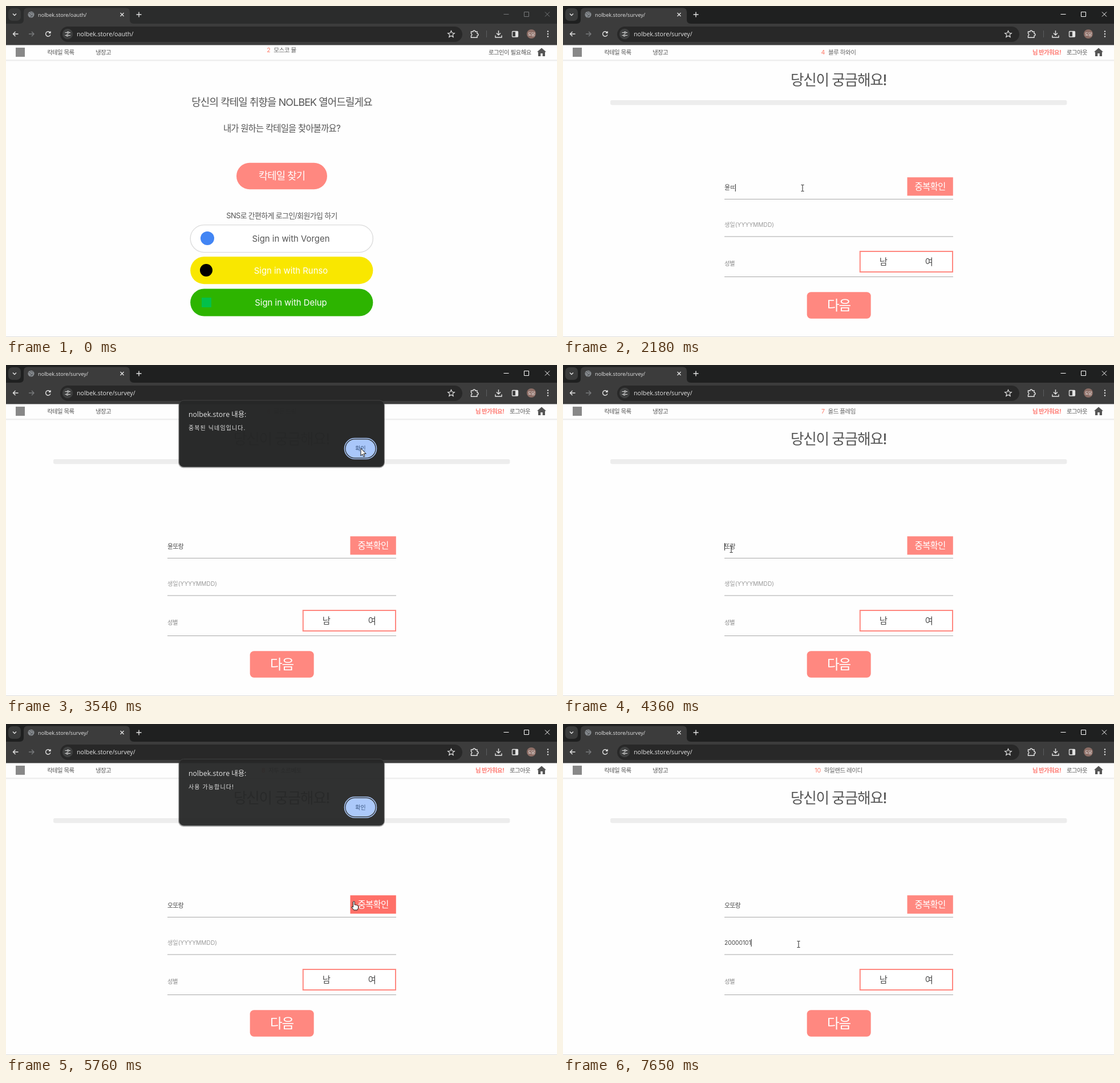
An HTML page that plays this animation: 966x580 px, repeating every 8000 ms.

```html
<!DOCTYPE html>
<html lang="ko">
<head>
<meta charset="utf-8">
<title>Sign-up flow</title>
<style>
html, body { margin: 0; width: 100%; height: 100%; overflow: hidden; background: #fff; }
svg { display: block; width: 100%; height: 100%; }
text { font-family: Inter, 'Noto Sans CJK KR', 'Noto Sans CJK', sans-serif; letter-spacing: -.05em; white-space: pre; }
.latin { letter-spacing: 0; }
.ui { font-family: 'Open Sans', 'Noto Sans CJK KR', sans-serif; letter-spacing: 0; }
.wide { letter-spacing: 1.1px; }
.line { fill: none; stroke-width: 1.4; }
</style>
</head>
<body>
<svg id="stage" viewBox="0 0 966 580" xmlns="http://www.w3.org/2000/svg"></svg>
<script>
const CORAL = '#ff8880', HOT = '#ff7068', INK = '#555', LIGHT = '#e3e3e3';
const $ = id => document.getElementById(id);

// Text is placed by its vertical centre.
const text = (x, y, size, str, fill = INK, attrs = '') =>
  `<text x="${x}" y="${y + size * .36}" font-size="${size}" fill="${fill}" ${attrs}>${str}</text>`;
const mid = (x, y, size, str, fill, attrs = '') =>
  text(x, y, size, str, fill, 'text-anchor="middle" ' + attrs);
const rect = (x, y, w, h, r, fill, attrs = '') =>
  `<rect x="${x}" y="${y}" width="${w}" height="${h}" rx="${r}" fill="${fill}" ${attrs}/>`;
const line = (d, color, attrs = '') => `<path class="line" d="${d}" stroke="${color}" ${attrs}/>`;
const dot = (x, y, r, fill) => `<circle cx="${x}" cy="${y}" r="${r}" fill="${fill}"/>`;
const latin = str => `<tspan class="latin">${str}</tspan>`;

const browser = `
  <rect id="titlebar" width="966" height="31"/>
  ${rect(4, 4, 22, 22, 7, '#3a3b3b')}${line('M12 13.5l3 3l3-3', LIGHT)}
  <path d="M24 31q7 0 7-7V10.500q0-7 7-7H210q7 0 7 7V24q0 7 7 7z" fill="#3c3c3c"/>
  ${rect(0, 31, 966, 37.500, 0, '#3c3c3c')}
  <g id="globe">${dot(44, 15, 5.6, '#868a8e')}
    ${line('M39.5 13q3 0 3.5 2.5t4-.5M42 10.5q2 2.5 6 1.5M43 20q0-3 4-3', '#505356', 'style="stroke-width:1"')}</g>
  <g id="spinner">${line('M44 9.8a5.2 5.2 0 1 1-5.2 5.2', '#a8c7fa')}</g>
  <text id="title" class="ui" x="56" y="19.2" font-size="9.2" fill="${LIGHT}"></text>
  ${line('M200.5 12l6 6m0-6l-6 6', LIGHT)}
  ${line('M233 10.5v9m-4.5-4.5h9', LIGHT)}
  <g id="winButtons" class="line" style="stroke-width:1">
    <path d="M872.5 14.5h9M908.5 10.5h8v8h-8zM945 10.5l8 8m0-8l-8 8"/></g>
  ${line('M21.5 49H12.5m4-4l-4 4l4 4', LIGHT)}
  ${line('M40 49h9m-4-4l4 4l-4 4', '#77797b')}
  ${line('M77.4 46.7a4.2 4.2 0 1 0 .5 3.4M78 44.3v3h-3', LIGHT)}
  ${rect(95, 36, 705, 27, 13.5, '#282828')}
  ${dot(108, 49, 9.2, '#3f4040')}
  ${line('M103.5 46.5h3m4.5 0h2M103.5 51.5h2m4.5 0h3', LIGHT, 'style="stroke-width:1.2"')}
  <g class="line" stroke="${LIGHT}" style="stroke-width:1.2"><circle cx="108.7" cy="46.5" r="1.5"/><circle cx="107.5" cy="51.5" r="1.5"/></g>
  <text id="address" class="ui" x="124" y="53.4" font-size="10.7" fill="${LIGHT}"></text>
  ${line('M780.5 43.5l1.7 3.8 4.1.4-3.1 2.7.9 4.1-3.6-2.2-3.6 2.2.9-4.1-3.1-2.7 4.1-.4z', LIGHT, 'style="stroke-width:1.2"')}
  ${line('M815.5 45h3.3a2 2 0 0 1 4 0h3.2v3.3a2 2 0 0 1 0 4v3h-10.5v-3.2a2 2 0 0 0 0-3.8z', LIGHT)}
  ${line('M842.5 43v12', '#5c5e60', 'style="stroke-width:1"')}
  ${line('M863.5 43v8m-3.5-3.4l3.5 3.5 3.5-3.5M858 51.5v3.5h11v-3.5', LIGHT)}
  ${rect(887.5, 44.5, 10, 9.5, 1, 'none', `stroke="${LIGHT}" stroke-width="1.3"`)}${rect(893, 45, 5, 9, 0, LIGHT)}
  ${dot(921, 49, 8, '#8d6e66')}${mid(921, 49, 7, '도담', '#fff')}
  ${[44.5, 49, 53.5].map(y => dot(950, y, 1.2, LIGHT)).join('')}`;

const header = `
  ${rect(0, 94.5, 966, 1, 0, '#dedede')}${rect(0, 95.5, 966, 1, 0, '#f1f1f1')}
  ${rect(17, 73, 16, 16, 0, '#888')}
  ${text(72, 81, 10.4, '칵테일 목록')}${text(157, 81, 10.4, '냉장고')}
  <text id="ticker" x="483" text-anchor="middle" font-size="10.6"><tspan
    id="rank" class="latin" fill="#ff7a68"></tspan><tspan id="drink" dx="5.5" fill="#666"></tspan></text>
  <path d="M939 73.5l8 7h-2v7.5h-4.3v-5h-3.4v5H933v-7.5h-2z" fill="#555"/>
  ${rect(0, 579, 966, 1, 0, '#dedede')}`;

const signIn = (y, fill, color, name, icon, border = '') =>
  rect(323.2, y, 320.2, 48, 24, fill, border) + icon +
  mid(499.5, y + 24.2, 14.9, 'Sign in with ' + name, color, 'class="latin"');

const login = `
  ${text(846, 81, 10.4, '로그인이 필요해요')}
  ${mid(483.5, 168.5, 17.9, '당신의 칵테일 취향을 NOLBEK 열어드릴게요')}
  ${mid(483.5, 214, 15.4, '내가 원하는 칵테일을 찾아볼까요?')}
  ${rect(404, 274.8, 159, 46.5, 23.2, CORAL)}${mid(483.5, 298, 17.8, '칵테일 찾기', '#fff')}
  ${mid(483.5, 367.5, 12.9, 'SNS로 간편하게 로그인/회원가입 하기')}
  ${signIn(383.6, '#fff', INK, 'Vorgen', dot(353, 407, 12, '#4285f4'), 'stroke="#dcdcdc" stroke-width="1.4"')}
  ${signIn(439.2, '#f9e700', '#fff', 'Runso', dot(351, 463, 11, '#000'))}
  ${signIn(495.5, '#2db400', '#fff', 'Delup', rect(343, 511, 17, 17, 0, '#03c04a'))}`;

const survey = `
  ${text(823, 81, 10.4, '님 반가워요!', '#ff7a72', 'font-weight="700"')}${text(883, 81, 10.4, '로그아웃')}
  ${mid(483, 130, 25.6, '당신이 궁금해요!', INK, 'font-weight="500"')}
  ${rect(83, 165, 800.5, 8.5, 3, '#ededed')}
  ${[338, 403.5, 474].map(y => rect(283, y, 401, 1, 0, '#a8a8a8')).join('')}
  <text id="nick" x="283" y="321.9" font-size="10.8"></text>
  <text id="birth" class="latin" x="283" y="387.4" font-size="10.2"></text>
  <rect id="caret" width="1" height="13" fill="#222"/>
  ${text(283, 451.5, 10.4, '성별', '#888')}
  <rect id="check" x="603.5" y="300.2" width="80.3" height="32.2"/>
  ${mid(643.5, 316.5, 15.5, '중복확인', '#fff')}
  ${rect(520.8, 430, 162.2, 36, 0, '#fff', `stroke="${CORAL}" stroke-width="2"`)}
  ${mid(561.5, 448, 15.4, '남', '#4c4c4c')}${mid(641.5, 448, 15.4, '여', '#4c4c4c')}
  ${rect(427.7, 501.2, 112, 46.6, 7, CORAL)}${mid(483.5, 524.5, 23.6, '다음', '#fff')}`;

const dialog = `
  ${rect(302, 62, 362, 118.5, 9, '#000', 'opacity=".3"')}
  ${rect(303.5, 62, 359.5, 116.5, 8, '#262727', 'stroke="#4a4b4b" stroke-width=".8"')}
  ${text(320, 87, 12.4, 'nolbek.store 내용:', LIGHT, 'class="ui"')}
  <text id="message" class="wide" x="320" y="114.3" font-size="10" fill="${LIGHT}"></text>
  ${rect(593.5, 128.5, 56, 36, 18, 'none', 'stroke="#a8c7fa" stroke-width="1.5"')}
  ${rect(595.5, 130.5, 52, 32, 16, '#a8c7fa')}
  ${mid(621.5, 146.5, 10, '확인', '#34517f', 'style="letter-spacing:0"')}`;

const cursors = `
  <g id="beam">${line('M-2.5-5.5h2l.5.5.5-.5h2M0-5V5M-2.5 5.5h2l.5-.5.5.5h2', '#222', 'style="stroke-width:1"')}</g>
  <path id="hand" d="M-1.5.5q1.5-1.5 2.7 0V6q1.5-.8 2.2.3 1.5-.6 2.2.6 2-.3 2 1.4v3.2L6 15H-.2L-4.3 9.8q.6-1.7 2.8.2z"
    fill="#fff" stroke="#111"/>
  <path id="arrow" d="M0 0V13l3-2.8 2 4.6 2-.9-2-4.4h4.2z" fill="#fff" stroke="#111"/>`;

$('stage').innerHTML = `
  ${rect(0, 0, 966, 580, 0, '#fefefe')}${header}
  <g id="login">${login}</g><g id="survey">${survey}</g>${browser}
  <g id="dialog">${dialog}</g><g id="cursor">${cursors}</g>`;

const SWAP = 900;
const pointer = [
  [70, 520, 545], [450, 505, 380], [830, 497, 321], [960, 497, 321], [1400, 420, 319],
  [2690, 420, 319], [2820, 651, 321], [3050, 651, 321], [3400, 622, 146], [3560, 622, 146],
  [3960, 295, 323], [4600, 295, 323], [5130, 565, 322], [5400, 610, 311], [6040, 610, 311],
  [6250, 417, 373], [6390, 413, 386], [8000, 413, 386]];
// time, value, caret index
const nickSteps = [
  [0, '', 0], [1790, 'ㅇ', 1], [1880, '유', 1], [1980, '윤', 1], [2110, '윤ㄸ', 2], [2230, '윤또', 2],
  [2350, '윤또ㄹ', 3], [2460, '윤또라', 3], [2570, '윤또랑', 3], [3900, '윤또랑', 1],
  [4360, '또랑', 0], [4450, 'ㅇ또랑', 1], [4540, '오또랑', 1]];
const birthSteps = [0, 6590, 6790, 7010, 7120, 7320, 7430, 7540, 7650]
  .map((t, i) => [t, '20000101'.slice(0, i), i]);
const ranking = [
  [0, 2, '모스코 뮬'], [970, 3, '핑크 레이디'], [1860, 4, '블루 하와이'], [2400, 5, '베스퍼 마티니'],
  [3000, 6, '골든 드림'], [3900, 7, '올드 플레임'], [4900, 8, '자두 소르베토'],
  [5900, 9, '노을구름 자두 소르베토'], [6900, 10, '하일랜드 레이디']];
const dialogs = [[2816, 3540, '중복된 닉네임입니다.'], [5604, 5965, '사용 가능합니다!']];

const clamp = v => Math.max(0, Math.min(1, v));
const within = (t, a, b) => t >= a && t < b;
const current = (list, t) => list.findLast(s => s[0] <= t);
const show = (id, on) => $(id).setAttribute('display', on ? 'inline' : 'none');
const set = (id, str) => { if ($(id).textContent !== str) $(id).textContent = str; };

function field(id, value, hint) {
  set(id, value || hint);
  $(id).setAttribute('fill', value ? '#444' : '#999');
}

function drawCaret(t, nick, birth) {
  const inNick = within(t, 1400, 2816) || within(t, 3900, 5560);
  const inBirth = t >= 6390;
  show('caret', inNick || inBirth);
  if (!inNick && !inBirth) return;
  const [id, n, y] = inNick ? ['nick', nick[2], 312] : ['birth', birth[2], 377];
  const x = 283 + (n ? $(id).getSubStringLength(0, n) : 0);
  $('caret').setAttribute('x', x);
  $('caret').setAttribute('y', y);
}

function drawDialog(t) {
  const d = dialogs.find(([a, b]) => within(t, a, b + 70));
  show('dialog', d);
  if (!d) return;
  const [open, close, str] = d;
  const ease = 1 - (1 - clamp((t - open) / 200)) ** 2;
  set('message', str);
  $('dialog').setAttribute('transform', `translate(0 ${-12 * (1 - ease)})`);
  $('dialog').setAttribute('opacity', ease * (1 - clamp((t - close) / 70)));
}

function drawPointer(t) {
  show('cursor', t >= 70);
  const i = Math.max(1, pointer.findIndex(p => p[0] > t));
  const [t0, x0, y0] = pointer[i - 1], [t1, x1, y1] = pointer[i];
  const u = clamp((t - t0) / (t1 - t0)), e = u * u * (3 - 2 * u);
  const x = x0 + (x1 - x0) * e, y = y0 + (y1 - y0) * e;
  const onPage = t >= SWAP;
  const hover = onPage && within(x, 603, 684) && within(y, 300, 333);
  const onField = onPage && within(x, 283, 603) && (within(y, 305, 338) || within(y, 365, 403));
  const onLink = !onPage && within(x, 323, 643) && within(y, 384, 544);
  show('hand', hover || onLink);
  show('beam', onField);
  show('arrow', !hover && !onLink && !onField);
  $('cursor').setAttribute('transform', `translate(${x} ${y})`);
  $('check').setAttribute('fill', hover ? HOT : CORAL);
}

function draw(now) {
  const t = now % 8000, loggedIn = t >= SWAP, active = t >= 70;
  show('login', !loggedIn);
  show('survey', loggedIn);
  const url = `nolbek.store/${loggedIn ? 'survey' : 'oauth'}/`;
  set('title', url);
  set('address', url);
  $('titlebar').setAttribute('fill', active ? '#1f2020' : '#2b2c2c');
  $('winButtons').setAttribute('stroke', active ? '#fff' : '#77797b');

  const loading = within(t, 100, 870);
  show('globe', !loading);
  show('spinner', loading);
  $('spinner').setAttribute('transform', `rotate(${t * .45} 44 15)`);

  const [, rank, drink] = current(ranking, t);
  set('rank', String(rank));
  set('drink', drink);
  $('ticker').setAttribute('y', rank === 2 ? 81.3 : 84.8);

  const nick = current(nickSteps, t), birth = current(birthSteps, t);
  field('nick', nick[1], '닉네임');
  field('birth', birth[1], '생일(YYYYMMDD)');
  if (loggedIn) drawCaret(t, nick, birth);
  drawDialog(t);
  drawPointer(t);
  requestAnimationFrame(draw);
}
requestAnimationFrame(draw);
</script>
</body>
</html>
```
